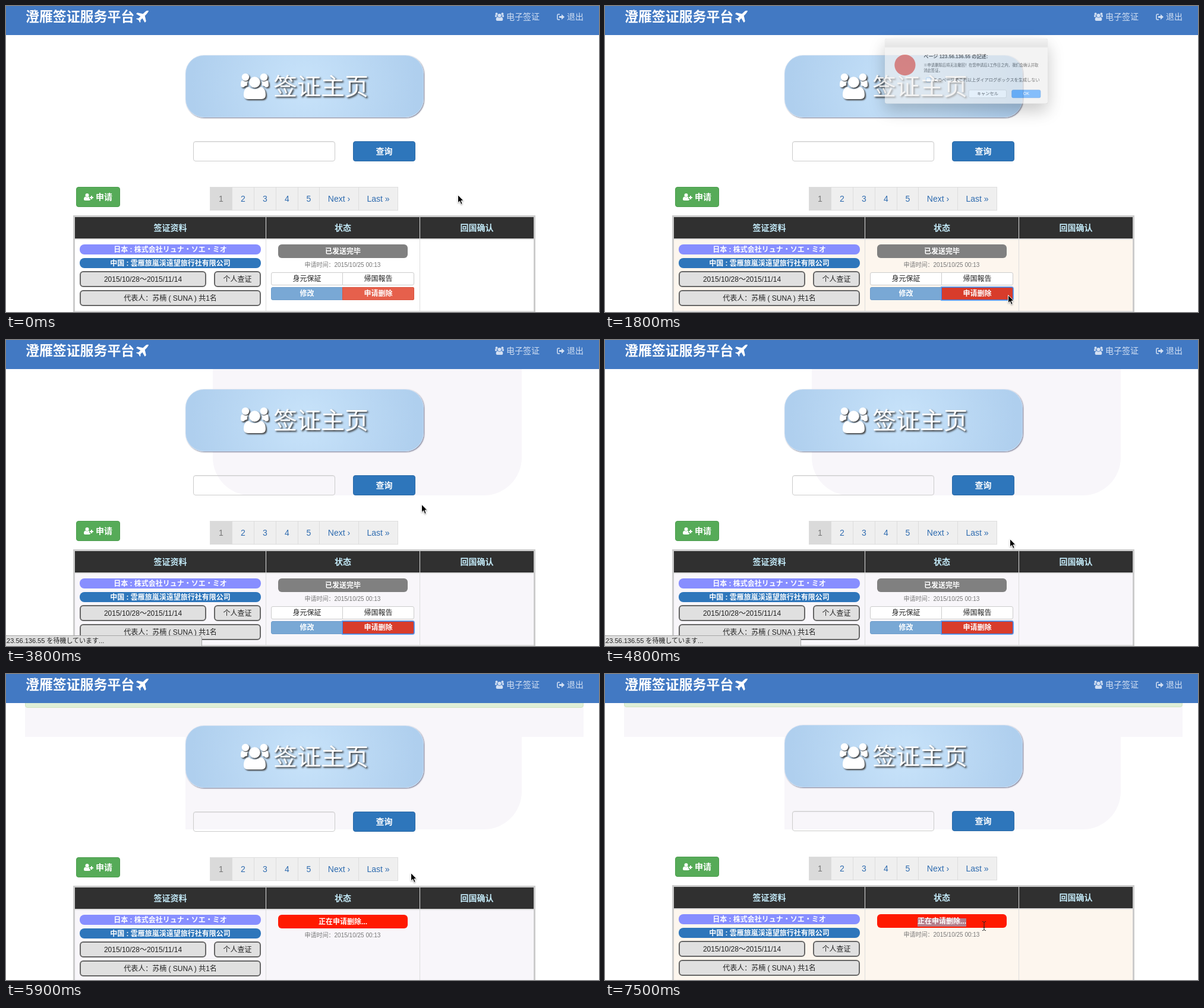
Write an HTML page that moves like this. It is 998 px wide and 516 px high and loops after 7.6 s.

```html
<!DOCTYPE html>
<html lang="zh-CN">
<head>
<meta charset="utf-8">
<title>签证主页</title>
<style>
html, body { margin: 0; width: 100%; height: 100%; overflow: hidden; background: #fff; }
#stage { position: relative; width: 998px; height: 516px; overflow: hidden; background: #fff;
  font: 12px/1 "Liberation Sans", "Noto Sans CJK SC", sans-serif; color: #222; }
#stage div, #stage svg { position: absolute; box-sizing: border-box; }
#stage .c { display: flex; align-items: center; justify-content: center; white-space: nowrap; }
.b { font-weight: bold; }
.w { color: #fff; }
svg { overflow: visible; fill: currentColor; }

/* All motion shares one clock, set by the script. */
.a { animation: 7600ms linear infinite paused; }
.step { animation-timing-function: step-end; }

#nav { left: 0; top: 0; width: 998px; height: 49px; background: #4279c3; color: #d3e0f3; }
#brand { left: 33px; top: 7px; font-size: 23px; letter-spacing: -.1px; white-space: nowrap; }
.link { top: 11px; font-size: 14px; white-space: nowrap; }

#page { left: 0; top: 0; width: 998px; height: 620px; animation-name: scroll; }
#hero { left: 302px; top: 83px; width: 401px; height: 105px; border-radius: 31px;
  background: radial-gradient(circle at 50% 50%, #c8e3fa, #afcfee 190px);
  border: 1px solid #c2d9f1; box-shadow: 1px 1px 2px rgba(60, 65, 100, .7); }
#hero-text { left: 450px; top: 116px; font-size: 40px; text-shadow: 2px 2px 3px #333; white-space: nowrap; }
#hero-icon { left: 395px; top: 113px; filter: drop-shadow(2px 2px 1px #444); }
#query { left: 315px; top: 228px; width: 239px; height: 34px; border: 1px solid #ccc; border-radius: 4px;
  box-shadow: inset 0 1px 1px rgba(0, 0, 0, .07); }
.btn { height: 34px; border-radius: 4px; font-size: 14px; }
#find { left: 584px; top: 228px; width: 105px; background: #2e76bb; border: 1px solid #2a69a6; }
#apply { left: 118px; top: 305px; width: 74px; background: #56ab58; border: 1px solid #4b9c4d; }
#pager { left: 343px; top: 305px; width: 317px; height: 40px; background: #efefef; border: 1px solid #ddd; }
#pager div { top: 0; height: 38px; border-right: 1px solid #ddd; font-size: 14px; color: #2f6cb0; }

#table { left: 113px; top: 353px; width: 778px; height: 260px; border: 3px solid #ccc; }
#head { left: 0; top: 0; width: 772px; height: 36px; background: #303030; color: #c5ecfb; font-size: 14px; }
#row { left: 0; top: 36px; width: 772px; height: 124px; border: solid #ddd; border-width: 2px 0; animation-name: row; }
.rule { top: 0; width: 1px; height: 160px; background: #ddd; }
.pill, .tag, #time { font-family: "Liberation Sans", "Noto Sans CJK JP", sans-serif; }
.pill { left: 124px; width: 305px; height: 17px; border-radius: 8px; }
.tag { height: 27px; background: #e0e0e0; border: 2px solid #666; border-radius: 6px; }
.state { left: 458px; top: 402px; width: 218px; height: 23px; border-radius: 6px; }
#time { left: 446px; top: 431px; width: 241px; height: 11px; font-size: 10px; color: #777; }
.half { width: 121px; height: 22px; }
.doc { top: 449px; background: #fff; border: 1px solid #ccc; }
#edit { left: 446px; top: 474px; background: #79a8d5; border: 1px solid #6c9ccb; border-radius: 3px 0 0 3px; }
#delete { left: 566px; top: 474px; border-radius: 0 3px 3px 0; animation-name: press; }
#mark { left: 526px; top: 409px; width: 82px; height: 14px; background: #b37f8c; transform-origin: 0 0; animation-name: mark; }
#alert { left: 32px; top: 1px; width: 940px; height: 52px; background: #deeed7; border: 1px solid #cfe4c0;
  border-radius: 4px; color: #3f6b40; font-size: 14px; line-height: 50px; padding-left: 16px; }
.old { animation-name: old; }
.new { animation-name: fresh; }

.tint { background: #f8f6fa; }
#tint1 { left: 348px; top: 0; width: 520px; height: 262px; border-radius: 0 0 64px 64px; animation-name: tint1; }
#tint2 { left: 302px; top: 49px; width: 500px; height: 213px; animation-name: fresh; }
#tint3 { left: 32px; top: 49px; width: 940px; height: 57px; animation-name: tint3; }

#dialog { left: 398px; top: 26px; width: 420px; height: 168px; border-radius: 5px; background: #ececec;
  box-shadow: 0 18px 44px rgba(0, 0, 0, .36), 0 0 1px rgba(0, 0, 0, .5); animation-name: dialog; }
#dialog div { white-space: nowrap; }
#bar { left: 0; top: 0; width: 420px; height: 22px; border-radius: 5px 5px 0 0;
  background: linear-gradient(#ebebeb, #d5d5d5); border-bottom: 1px solid #b8b8b8; }
#logo { left: 25px; top: 41px; width: 54px; height: 54px; border-radius: 50%; background: #dd4b3e; }
.key { top: 132px; height: 21px; border-radius: 4px; font-size: 11px; background: #fff; border: 1px solid #c4c4c4; }
#status { left: -1px; top: 498px; width: 331px; height: 19px; border: 1px solid #a8a8a8; border-radius: 0 4px 0 0;
  background: #dedede; font-size: 11px; line-height: 17px; text-indent: -5px; white-space: nowrap; animation-name: status; }
#cursor { left: 0; top: 0; animation-name: move; }
#arrow { animation-name: arrow; }
#beam { animation-name: beam; }

@keyframes scroll {
  0%, 68.3% { transform: translateY(0); }
  68.4%, 72.37% { transform: translateY(52px); }
  77.63% { transform: translateY(4px); }
  78.9%, 100% { transform: translateY(3px); }
}
@keyframes move {
  0%, 2.6% { transform: translate(760px, 318px); }
  15.8%, 25% { transform: translate(678px, 487px); }
  32.9%, 44.7% { transform: translate(791px, 165px); }
  48.7% { transform: translate(706px, 271px); }
  52.6% { transform: translate(685px, 288px); }
  56.6%, 78.9% { transform: translate(681px, 335px); }
  86.8%, 89.4% { transform: translate(522px, 417px); }
  94.7%, 100% { transform: translate(638px, 425px); }
}
@keyframes dialog {
  0%, 22.36% { opacity: 0; transform: scale(.5); }
  23.68% { opacity: .62; transform: scale(.652); }
  26.3%, 35.5% { opacity: 1; transform: none; }
  36.8%, 100% { opacity: 0; transform: none; }
}
@keyframes status {
  0%, 40.7% { opacity: 0; }
  40.78%, 68.4% { opacity: 1; }
  69.74% { opacity: .8; }
  72.4%, 100% { opacity: 0; }
}
@keyframes row {
  0% { background-color: #fff; }
  8.5% { background-color: #fdf6ee; }
  36.8% { background-color: #f8f6fa; }
  82.8%, 100% { background-color: #fdf6ee; }
}
@keyframes press {
  0% { background-color: #e6604c; box-shadow: inset 0 0 0 1px #d8533f; }
  14.4% { background-color: #d83c2b; box-shadow: inset 0 0 0 1px #b93426; }
  19.7%, 100% { background-color: #d83c2b; box-shadow: inset 0 0 0 1px #3f7fe0, 0 0 1px 1px #6aa5f0; }
}
@keyframes mark {
  0%, 89.6% { transform: scaleX(0); }
  93.6%, 100% { transform: none; }
}
@keyframes old { 0% { visibility: visible; } 68.4%, 100% { visibility: hidden; } }
@keyframes fresh { 0% { visibility: hidden; } 68.4%, 100% { visibility: visible; } }
@keyframes tint1 { 0% { visibility: hidden; } 26.3%, 100% { visibility: visible; } }
@keyframes tint3 { 0% { visibility: hidden; } 73.6%, 100% { visibility: visible; } }
@keyframes arrow { 0% { visibility: visible; } 85.5%, 100% { visibility: hidden; } }
@keyframes beam { 0% { visibility: hidden; } 85.5%, 100% { visibility: visible; } }
</style>
</head>
<body>
<svg width="0" height="0" style="position:absolute">
  <symbol id="users" viewBox="0 0 47 44">
    <g id="side"><circle cx="8" cy="7" r="6.2"/><path d="M0 21C0 15 1 12 3 12.500Q8 16 12 13.500Q10 17 11 21Q7 21.500 5 24Q0 24.500 0 21Z"/></g>
    <use href="#side" transform="matrix(-1 0 0 1 47 0)"/>
    <circle cx="23.5" cy="15.500" r="9.300"/>
    <path d="M5 37C5 28 9 23.500 14 23.500Q23.500 31 33 23.500C38 23.500 42 28 42 37Q42 44 35 44H12Q5 44 5 37Z"/>
  </symbol>
</svg>

<div id="stage">
  <div id="tint1" class="tint a step"></div>
  <div id="tint2" class="tint a step"></div>
  <div id="tint3" class="tint a step"></div>

  <div id="page" class="a">
    <div id="alert" class="new a step">申请完毕。我们会在1工作日之内确认并完全删除此签证。</div>
    <div id="hero"></div>
    <svg id="hero-icon" class="w" width="47" height="44"><use href="#users"/></svg>
    <div id="hero-text" class="w">签证主页</div>
    <div id="query"></div>
    <div id="find" class="btn c b w">查询</div>
    <div id="apply" class="btn b w">
      <svg style="left:12px;top:10px" width="16" height="12" viewBox="0 0 16 12">
        <circle cx="5.500" cy="3" r="3"/>
        <path d="M0 10Q0 5.500 3 5.500Q5.500 7.500 8 5.500L9 6V9H11V11Q10 12 9 12H2Q0 12 0 10ZM10 6H12V4H14V6H16V8H14V10H12V8H10Z"/>
      </svg>
      <div style="left:32px;top:9px;white-space:nowrap">申请</div>
    </div>

    <div id="pager">
      <div class="c" style="left:0;width:37px;background:#dadada;color:#777">1</div>
      <div class="c" style="left:37px;width:37px">2</div>
      <div class="c" style="left:74px;width:37px">3</div>
      <div class="c" style="left:111px;width:37px">4</div>
      <div class="c" style="left:148px;width:36px">5</div>
      <div class="c" style="left:184px;width:66px">Next ›</div>
      <div class="c" style="left:250px;width:65px;border:0">Last »</div>
    </div>

    <div id="table">
      <div id="row" class="a step"></div>
      <div id="head" class="b">
        <div class="c" style="left:0;width:321px;height:36px">签证资料</div>
        <div class="c" style="left:322px;width:258px;height:36px">状态</div>
        <div class="c" style="left:581px;width:191px;height:36px">回国确认</div>
      </div>
      <div class="rule" style="left:321px"></div>
      <div class="rule" style="left:580px"></div>
    </div>

    <div class="pill c b w" style="top:402px;background:#878eff">日本 : 株式会社リュナ・ソエ・ミオ</div>
    <div class="pill c b w" style="top:425px;background:#2e76bb">中国 : 雲雁旅嵐渓遠望旅行社有限公司</div>
    <div class="tag c" style="left:124px;top:447px;width:213px">2015/10/28～2015/11/14</div>
    <div class="tag c" style="left:350px;top:447px;width:79px">个人查证</div>
    <div class="tag c" style="left:124px;top:479px;width:305px">代表人：苏楠 ( SUNA ) 共1名</div>

    <div id="time" class="c">申请时间：2015/10/25 00:13</div>
    <div class="old a step">
      <div class="state c b w" style="background:#808080">已发送完毕</div>
      <div class="half doc c" style="left:446px;border-radius:3px 0 0 3px">身元保証</div>
      <div class="half doc c" style="left:566px;border-radius:0 3px 3px 0">帰国報告</div>
      <div id="edit" class="half c b w">修改</div>
      <div id="delete" class="half c b w a step">申请删除</div>
    </div>
    <div class="new a step">
      <div class="state" style="background:#ff1a00"></div>
      <div id="mark" class="a"></div>
      <div class="state c b w">正在申请删除...</div>
    </div>
  </div>

  <div id="nav">
    <div id="brand" class="b w">澄雁签证服务平台</div>
    <svg class="w" style="left:219px;top:8px" width="21" height="20" viewBox="0 0 20 19">
      <path d="M20 0Q17-1 14 2L11 5 2 3 0 5 7 9 4 12 1 12 0 13 4 15 6 19 7 18 7 15 10 12 14 19 16 17 14 8 17 5Q20 2 20 0Z"/>
    </svg>
    <svg style="left:823px;top:11px" width="15" height="14"><use href="#users"/></svg>
    <div class="link" style="left:842px">电子签证</div>
    <svg style="left:927px;top:13px" width="13" height="11" viewBox="0 0 13 11">
      <path d="M5 1H2.500Q1 1 1 2.500V8.500Q1 10 2.500 10H5" fill="none" stroke="currentColor" stroke-width="1.500"/>
      <path d="M4 4H8V1L13 5.500 8 10V7H4Z"/>
    </svg>
    <div class="link" style="left:944px">退出</div>
  </div>

  <div id="dialog" class="a">
    <div id="bar"></div>
    <div id="logo"></div>
    <div class="b" style="left:100px;top:41px;font-size:12.500px">ページ 123.56.136.55 の記述:</div>
    <div style="left:100px;top:62px;font-size:9.700px;line-height:14px">※申请删除后将无法撤回！在您申请后1工作日之内，我们会确认并取<br>消此签证。</div>
    <div style="left:106px;top:100px;width:13px;height:13px;border-radius:3px;background:#fff;border:1px solid #7fb4ee"></div>
    <div style="left:125px;top:101px;font-size:11px">このページでこれ以上ダイアログボックスを生成しない</div>
    <div class="key c" style="left:216px;width:98px">キャンセル</div>
    <div class="key c w" style="left:327px;width:75px;background:#3b96f8;border-color:#2d80dc">OK</div>
  </div>

  <div id="status" class="a">123.56.136.55 を待機しています...</div>

  <div id="cursor" class="a">
    <svg id="arrow" class="a step" width="12" height="18" style="filter:drop-shadow(0 1px 1px rgba(0,0,0,.35))">
      <path d="M.5.5V14L3.600 11 5.800 16.500 8.200 15.500 6 10.300H10Z" fill="#000" stroke="#fff"/>
    </svg>
    <svg id="beam" class="a step" style="left:-4px;top:-8px" width="8" height="16">
      <path d="M1 .5H2.500L4 2 5.500.5H7M4 2V14M1 15.500H2.500L4 14 5.500 15.500H7M2.500 10.500H5.500" fill="none" stroke="#222"/>
    </svg>
  </div>
</div>

<script>
const LOOP = 7600, STEP = 100;
const moves = document.getAnimations();
const start = performance.now();

// The picture advances ten times a second.
function tick() {
  const t = (performance.now() - start) % LOOP;
  const held = Math.floor(t / STEP) * STEP;
  for (const move of moves) move.currentTime = held;
  requestAnimationFrame(tick);
}
tick();
</script>
</body>
</html>
```
